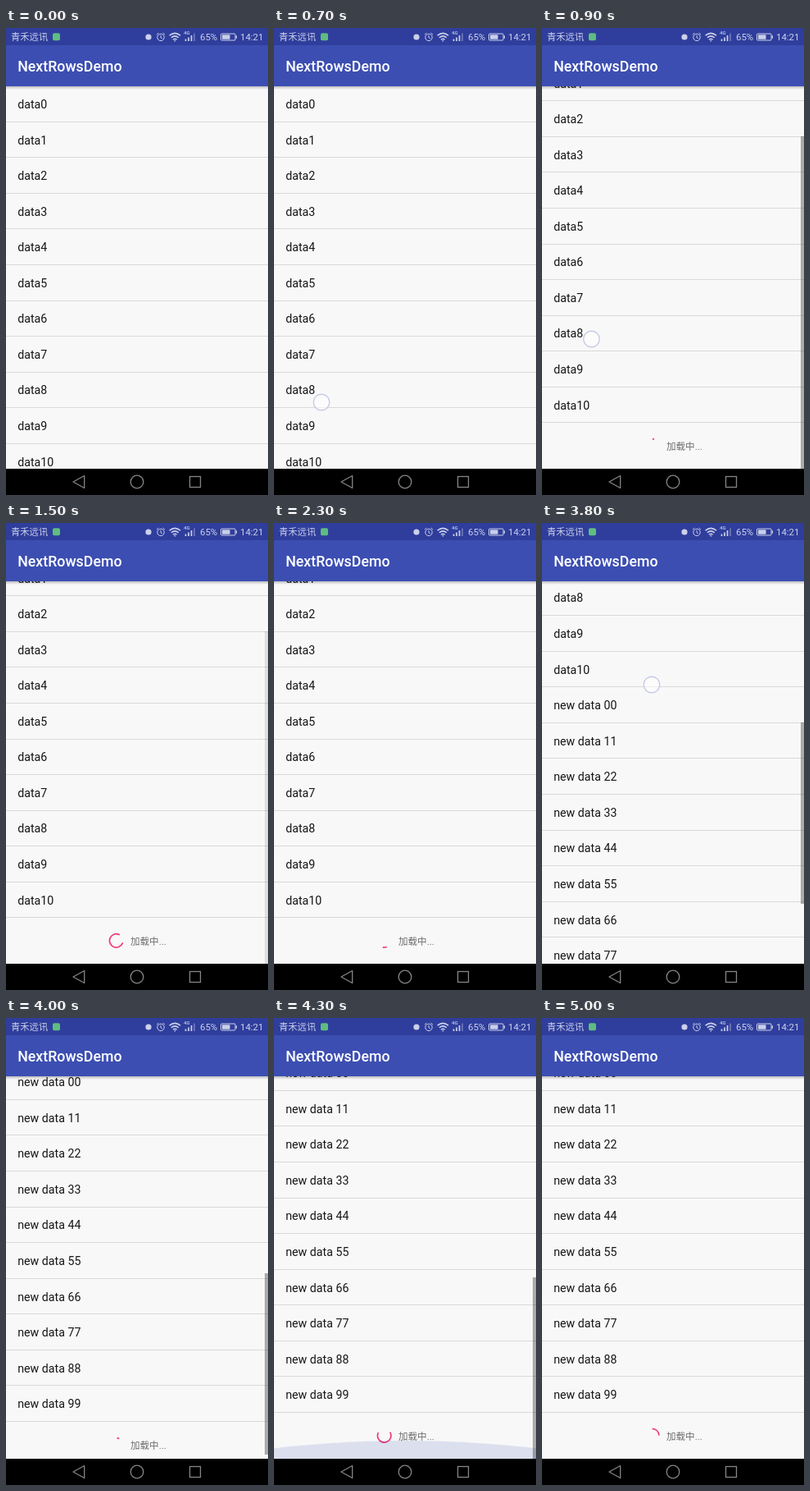
These frames come from a looping animation (320 by 569 pixels, 5100 ms). An HTML page:

```html
<!DOCTYPE html>
<html lang="zh">
<head>
<meta charset="utf-8">
<title>NextRowsDemo</title>
<style>
  html, body { margin: 0; width: 100%; height: 100%; overflow: hidden; background: #000; }
  body { position: relative; font-family: Roboto, "Noto Sans CJK SC", "Noto Sans CJK", sans-serif; }
  #stage { position: absolute; left: 0; top: 0; width: 320px; height: 569px; overflow: hidden; background: #f8f8f8; }
  #stage svg { position: absolute; left: 0; top: 0; overflow: visible; }

  #view { position: absolute; left: 0; top: 71px; width: 320px; height: 466px; overflow: hidden; }
  #list { position: absolute; left: 0; top: 0; width: 320px; }
  .row, #footer { position: absolute; left: 0; width: 320px; white-space: pre; }
  .row { height: 43px; line-height: 45px; text-indent: 14.2px; font-size: 14.22px; color: #161616; }
  .row::after { content: ""; position: absolute; left: 0; top: 42.75px; width: 100%; height: 1px; background: #d9d9d9; }
  #footer { height: 56px; line-height: 57px; text-indent: 152px; font-size: 11.56px; color: #6c6c6c; }
  #arc { fill: none; stroke: #f23a7c; stroke-width: 1.75; stroke-linecap: square; }
  #bar { position: absolute; right: 0; top: 0; width: 4px; background: #000; }

  #status { position: absolute; left: 0; top: 0; width: 320px; height: 21px; background: #2f3e9c; }
  #toolbar { position: absolute; left: 0; top: 21px; width: 320px; height: 50px; background: #3c4eb2;
    line-height: 53px; text-indent: 14.2px; font-size: 17.78px; font-weight: 500; color: #fff; }
  #toolbar::after { content: ""; position: absolute; left: 0; top: 50px; width: 100%; height: 4px;
    background: linear-gradient(rgba(0,0,0,.24), rgba(0,0,0,0)); }
  #nav { position: absolute; left: 0; top: 537px; width: 320px; height: 32px; background: #000; }
  #status text { fill: #cbd0ea; }
</style>
</head>
<body>
<div id="stage">
  <div id="view">
    <div id="list">
      <div id="footer">加载中...
        <svg width="320" height="56"><circle id="arc" cx="134.7" cy="26.9" r="8.2" pathLength="360"/></svg>
      </div>
    </div>
    <svg width="320" height="466"><ellipse id="glow" cx="160" rx="480" fill="#3f51b5"/></svg>
    <div id="bar"></div>
  </div>

  <div id="toolbar">NextRowsDemo</div>

  <div id="status">
    <svg width="320" height="21" fill="none" stroke="#cbd0ea">
      <g stroke="none">
        <text x="6" y="15" font-size="11.3">青禾远讯</text>
        <text x="217" y="8.4" font-size="6" font-weight="500">4G</text>
        <text x="237" y="15.2" font-size="11.4">65%</text>
        <text x="286" y="15.2" font-size="11.4">14:21</text>
        <rect x="57" y="6.2" width="9" height="9" rx="2" fill="#5fbd80"/>
        <circle cx="174" cy="11" r="3.6" fill="#cbd0ea"/>
      </g>
      <circle cx="189" cy="11.4" r="4.2"/>
      <path d="M189 9v2.7l1.8 1M184 8.2l2.4-2.2M194 8.2l-2.4-2.2"/>
      <path d="M199.6 9.2q6.7-5.6 13.4 0M201.8 11.8q4.5-3.8 9 0M204 14.2q2.3-2 4.6 0" stroke-width="1.5"/>
      <circle cx="206.3" cy="15.6" r=".9" fill="#cbd0ea" stroke="none"/>
      <path d="M219.5 16v-2.6M223 16v-4.4M226.5 16v-7" stroke-width="1.7"/>
      <path d="M230 16v-9.5" stroke-width="1.7" opacity=".4"/>
      <rect x="262.5" y="7" width="17.5" height="8" rx="1"/>
      <path d="M264 11h9.5" stroke-width="5.4"/>
      <path d="M281.3 9.2v3.6" stroke-width="1.4"/>
    </svg>
  </div>

  <div id="nav">
    <svg width="320" height="32" fill="none" stroke="#858585" stroke-width="1.3">
      <path d="M82 16L95.7 8.5V23.5Z" stroke-linejoin="round"/>
      <circle cx="160" cy="16" r="7.8"/>
      <rect x="224.5" y="9.5" width="13" height="13"/>
    </svg>
  </div>

  <svg width="320" height="569">
    <circle id="touch" r="9.8" fill="#fff" fill-opacity=".6" stroke="#c6cce6" stroke-width="1.4"/>
  </svg>
</div>

<script>
const LOOP = 5100, STEP = 100;
const ROW = 43.56, VIEW = 466, FOOTER = 56, LOADED = 2900;
const $ = id => document.getElementById(id);
const list = $('list'), footer = $('footer'), arc = $('arc'),
      glow = $('glow'), bar = $('bar'), touch = $('touch');

// Each track is a list of [time, value] points.
const scroll = [[700, 0], [800, 5], [900, 69], [3500, 69], [3600, 110], [3700, 235],
                [3800, 350], [3900, 435], [4000, 494], [4100, 505]];
const glowSize = [[900, 0], [1000, .15], [1100, .18], [1200, .08], [1300, 0],
                  [4000, 0], [4100, .25], [4200, .38], [4300, .342], [4700, 0]];
const barFade = [[700, 0], [800, 1], [1300, 1], [1600, 0], [3500, 0], [3600, 1], [4600, 1], [4900, 0]];
const spinTime = [[855, 0], [2900, 2045], [3930, 0], [4300, 370], [5100, 1060]];
const drags = [
  { from: 700, to: 1000, x: [[700, 58], [800, 58], [1000, 63]],
    y: [[700, 456], [800, 444], [900, 379], [1000, 325]] },
  { from: 3500, to: 3800, x: [[3500, 127.5], [3800, 134]],
    y: [[3500, 485], [3600, 437], [3700, 312], [3800, 197]] }
];

function at(track, t) {
  const i = track.findIndex(p => p[0] > t);
  if (i === 0) return track[0][1];
  if (i < 0) return track[track.length - 1][1];
  const [t0, a] = track[i - 1], [t1, b] = track[i];
  return a + (b - a) * (t - t0) / (t1 - t0);
}

// cubic-bezier(.4, 0, .2, 1)
function ease(x) {
  if (x <= 0) return 0;
  if (x >= 1) return 1;
  let lo = 0, hi = 1;
  for (let i = 0; i < 24; i++) {
    const u = (lo + hi) / 2, v = 1 - u;
    if (1.2 * v * v * u + .6 * v * u * u + u * u * u < x) lo = u; else hi = u;
  }
  return lo * lo * (3 - 2 * lo);
}

for (let i = 0; i < 21; i++) {
  const row = document.createElement('div'), k = i - 11;
  row.className = 'row';
  row.textContent = i < 11 ? 'data' + i : 'new data ' + k + k;
  row.style.top = i * ROW + 'px';
  list.insertBefore(row, footer);
}
const rows = [...document.querySelectorAll('.row')];

function drawSpinner(ms) {
  const p = ms / 1333 % 1;
  const start = 270 * ease(2 * p - 1), end = 270 * ease(2 * p);
  const turn = 90 * p + 720 * ms / 6665 + start - 90;
  arc.setAttribute('stroke-dasharray', `${Math.max(.5, end - start)} 720`);
  arc.setAttribute('transform', `rotate(${turn} 134.7 26.9)`);
}

function draw(t) {
  const count = t < LOADED ? 11 : 21;
  const y = Math.round(at(scroll, t));
  rows.forEach((row, i) => row.style.display = i < count ? '' : 'none');
  footer.style.top = count * ROW + 1 + 'px';
  list.style.transform = `translateY(${-y}px)`;
  drawSpinner(at(spinTime, t));

  const k = at(glowSize, t);
  glow.setAttribute('cy', VIEW + 415.7 * k);
  glow.setAttribute('ry', 480 * k);
  glow.setAttribute('opacity', .15 * Math.min(1, k / .3));

  const range = 44.69 * (count + 1), end = count * ROW + FOOTER - VIEW;
  const size = VIEW * VIEW / range;
  bar.style.height = size + 'px';
  bar.style.top = VIEW - size - Math.max(0, end - y) * VIEW / range + 'px';
  bar.style.opacity = .31 * at(barFade, t);

  const drag = drags.find(d => t >= d.from && t <= d.to);
  touch.style.display = drag ? '' : 'none';
  if (drag) {
    touch.setAttribute('cx', at(drag.x, t));
    touch.setAttribute('cy', at(drag.y, t));
  }
}

const begin = performance.now();
function tick() {
  const t = (performance.now() - begin) % LOOP;
  draw(Math.floor(t / STEP) * STEP);
  requestAnimationFrame(tick);
}
tick();
</script>
</body>
</html>
```
